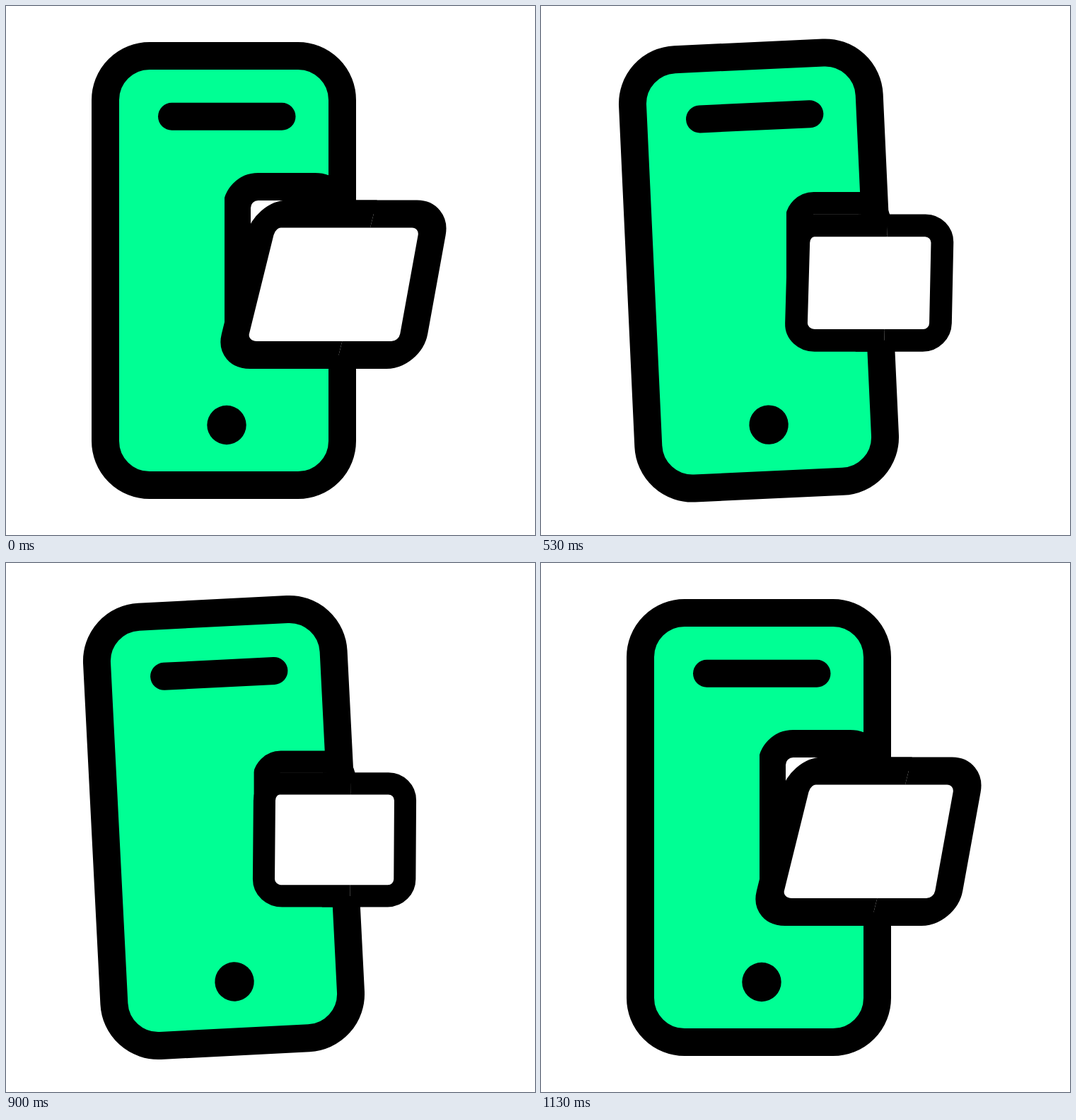
These frames come from a looping animation (748 by 748 pixels, 1.33 s). An HTML page without scripts:

```html
<!DOCTYPE html>
<html lang="en">
<head>
<meta charset="utf-8">
<title>Phone and folder</title>
<style>
  @property --tick {
    syntax: "<number>";
    inherits: true;
    initial-value: 0;
  }

  html, body {
    margin: 0;
    height: 100%;
    overflow: hidden;
    background: #fff;
  }

  /* --tick counts 30 fps steps; --pose runs 0 (open) to 1 (shut) and back */
  svg {
    display: block;
    width: 100%;
    height: 100%;
    animation: tick 1330ms steps(40, end) -5ms infinite;
    --shut: calc(1 - pow(2, -.613 * max(0, var(--tick) - 10.97)));
    --reopen: sin(90deg * clamp(0, (var(--tick) - 26.85) / 7.15, 1));
    --pose: calc(var(--shut) * (1 - var(--reopen)));
  }

  @keyframes tick {
    from { --tick: 0; }
    to { --tick: 40; }
  }

  .line {
    fill: #fff;
    stroke: #000;
    stroke-width: 39;
  }

  .body { fill: #00ff94; }

  .speaker { stroke-linecap: round; }

  .phone {
    transform-origin: 308px 374px;
    transform: rotate(calc(-3deg * var(--pose)));
  }

  .folder {
    transform-origin: 514px 382px;
    transform: scale(calc(1 - .21 * var(--pose)));
  }

  .flap {
    transform-origin: 450px var(--hinge);
    transform: skewX(calc(var(--lean) * (var(--pose) - 1)));
  }

  .left { --hinge: 455px; --lean: 13.9deg; }
  .right { --hinge: 465px; --lean: 10.3deg; }
</style>
</head>
<body>
<svg viewBox="0 0 748 748" aria-hidden="true">
  <clipPath id="edge"><rect x="309" y="200" width="300" height="300"/></clipPath>

  <g class="phone">
    <rect class="line body" x="140.5" y="70.5" width="335" height="607" rx="62.5"/>
    <path class="line speaker" d="M234.5 156.3H390"/>
    <circle cx="312" cy="592.5" r="27.7"/>
  </g>

  <g class="folder">
    <path class="line" clip-path="url(#edge)"
      d="M326.5 455V285.5A30 30 0 0 1 356.5 255.5H437A33 30 0 0 1 470 285.5"/>
    <path class="line flap right"
      d="M430 294H546.5A30 30 0 0 1 576.5 324V463.5A30 30 0 0 1 546.5 493.5H430"/>
    <path class="line flap left"
      d="M480 294H353.5A27 30 0 0 0 326.5 324V463.5A33 30 0 0 0 359.5 493.5H480"/>
  </g>
</svg>
</body>
</html>
```
